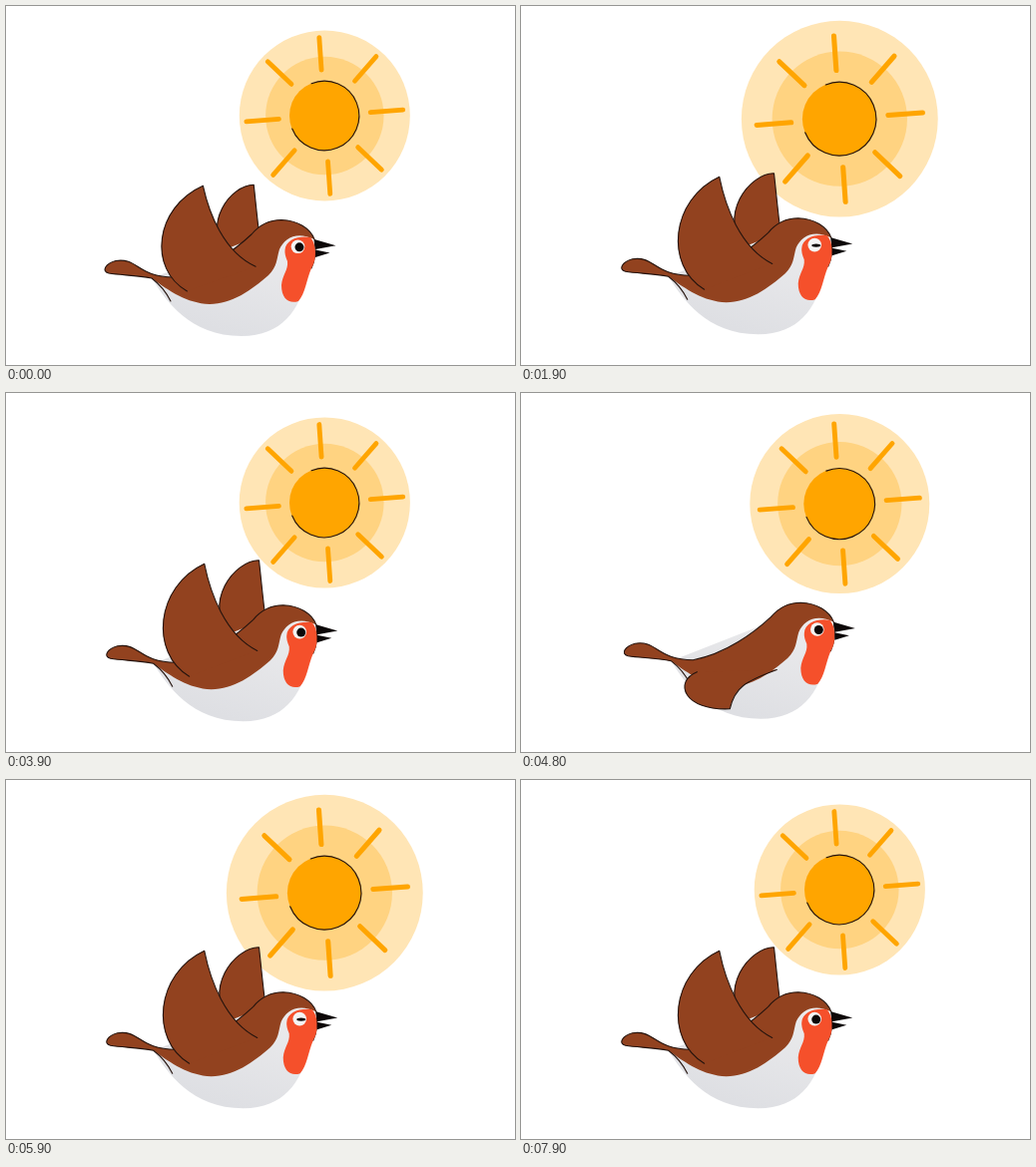
Animation, 510 px wide and 360 px high, one loop 8000 ms. Source, as an HTML page with a canvas:

```html
<!DOCTYPE html>
<html lang="en">
<head>
<meta charset="utf-8">
<title>Robin and sun</title>
<style>
html, body { margin: 0; width: 100%; height: 100%; overflow: hidden; background: #fff; }
canvas { display: block; width: 510px; height: 360px; }
</style>
</head>
<body>
<canvas id="stage" width="510" height="360"></canvas>
<script>
const ctx = document.getElementById('stage').getContext('2d');
const LOOP = 8000, FLAP = 2000, PULSE = 4000;
const BROWN = '#92421f', INK = '#24130d', ORANGE = '#ffa500', BLACK = '#0d0808';

// Body, drawn around its resting position; the spine runs from tail to beak
const spine = 'M150 269C135 266 120 266 107 264C99 262 104 254 114 251.5C136 248 136 268 172 268C205 262 234 240 250 225C260 213 270 210.5 280 210.5C296 211 309 219 313 230';
const body = new Path2D(spine + 'C295 221 283 229 278 240C275 250 276 257 267 266C250 281 230 295 208 295C185 294 168 282 150 269Z');
const outline = new Path2D(spine + 'Q316 246 310 259M150 269Q162 278 169 292');
const belly = new Path2D('M150 269C164 291 188 327 240 327C281 327 298 300 305 270Q318 240 301 222L262 225Z');
const face = new Path2D('M283.5 241C284 230 298 226 309 228C315 234 316 250 310 259C305 271 304 284 297 292C288 295 280 290 280 276C281 265 287 261 286 252Q283 245 283.5 241Z');
const beak = new Path2D('M313 230L334.5 236.2L314 240ZM314 240.5L328.5 243.5L314 248Z');

// Each wing is two curves that meet at the tip: root, tip, shoulder
const frontUp = [[186,282], [146,258], [152,191], [201,168], [207,198], [222,240], [254,256]];
const frontDown = [[176,280], [152,290], [163,320], [209,318], [214,296], [224,290], [256,278]];
const backUp = [[228,243], [198,205], [232,162], [257,162], [259,180], [261,202], [264,225]];
const backDown = backUp.map(() => [208, 300]);

// 0 at the given phase, 1 half a period later
const wave = (t, period, phase = 0) => (1 - Math.cos(2 * Math.PI * (t - phase) / period)) / 2;

function fill(path, color) {
  ctx.fillStyle = color;
  ctx.fill(path);
}

function line(path, color, width) {
  ctx.strokeStyle = color;
  ctx.lineWidth = width;
  ctx.stroke(path);
}

function disc(x, y, r, color, squash = 1) {
  const p = new Path2D();
  p.ellipse(x, y, r, r * squash, 0, 0, 2 * Math.PI);
  fill(p, color);
}

function wing(up, down, k) {
  const p = up.map(([x, y], i) => [x + (down[i][0] - x) * k, y + (down[i][1] - y) * k]);
  const path = new Path2D();
  path.moveTo(...p[0]);
  path.bezierCurveTo(...p.slice(1, 4).flat());
  path.bezierCurveTo(...p.slice(4).flat());
  fill(path, BROWN);
  line(path, INK, 1.1);
}

function sun(t) {
  const k = wave(t, PULSE);
  ctx.save();
  ctx.translate(319.3, 110 + 3.2 * k);
  disc(0, 0, 85.5 + 13 * k, '#ffe5b5');
  disc(0, 0, 59.2 + 8.5 * k, '#ffd381');
  ctx.scale(1 + 0.06 * k, 1 + 0.06 * k);
  const rays = new Path2D();
  for (const deg of [-4.3, 43.5, 86, 131]) {
    const a = deg * Math.PI / 180;
    for (const r of [46, -46]) {
      rays.moveTo(r * Math.cos(a), r * Math.sin(a));
      rays.lineTo(1.71 * r * Math.cos(a), 1.71 * r * Math.sin(a));
    }
  }
  line(rays, ORANGE, 4.8);
  disc(-0.3, 0, 35, ORANGE);
  const rim = new Path2D();
  rim.arc(-0.3, 0, 34.8, -1.95, 2.76);
  line(rim, INK, 1.1);
  ctx.restore();
}

function bird(t) {
  const rise = 6.4 * (2 * wave(t, FLAP, 285) - 1);
  ctx.save();
  ctx.translate(rise, -rise);
  wing(backUp, backDown, wave(t, FLAP, 1800));
  const shade = ctx.createLinearGradient(270, 235, 240, 328);
  shade.addColorStop(0, '#eaeaec');
  shade.addColorStop(1, '#dedfe3');
  fill(belly, shade);
  fill(body, BROWN);
  line(outline, INK, 1.1);
  fill(face, '#f5502b');
  fill(beak, BLACK);
  const open = Math.min(1, 0.35 + Math.abs(t % PULSE - 1900) / 150);
  disc(296.5, 237.3, 6.8, '#f4f4f4');
  disc(298, 237.8, 4.5, BLACK, open);
  wing(frontUp, frontDown, wave(t, FLAP, 1850));
  ctx.restore();
}

function draw() {
  const t = performance.now() % LOOP;
  ctx.fillStyle = '#fff';
  ctx.fillRect(0, 0, 510, 360);
  sun(t);
  bird(t);
  requestAnimationFrame(draw);
}

ctx.lineCap = ctx.lineJoin = 'round';
draw();
</script>
</body>
</html>
```
